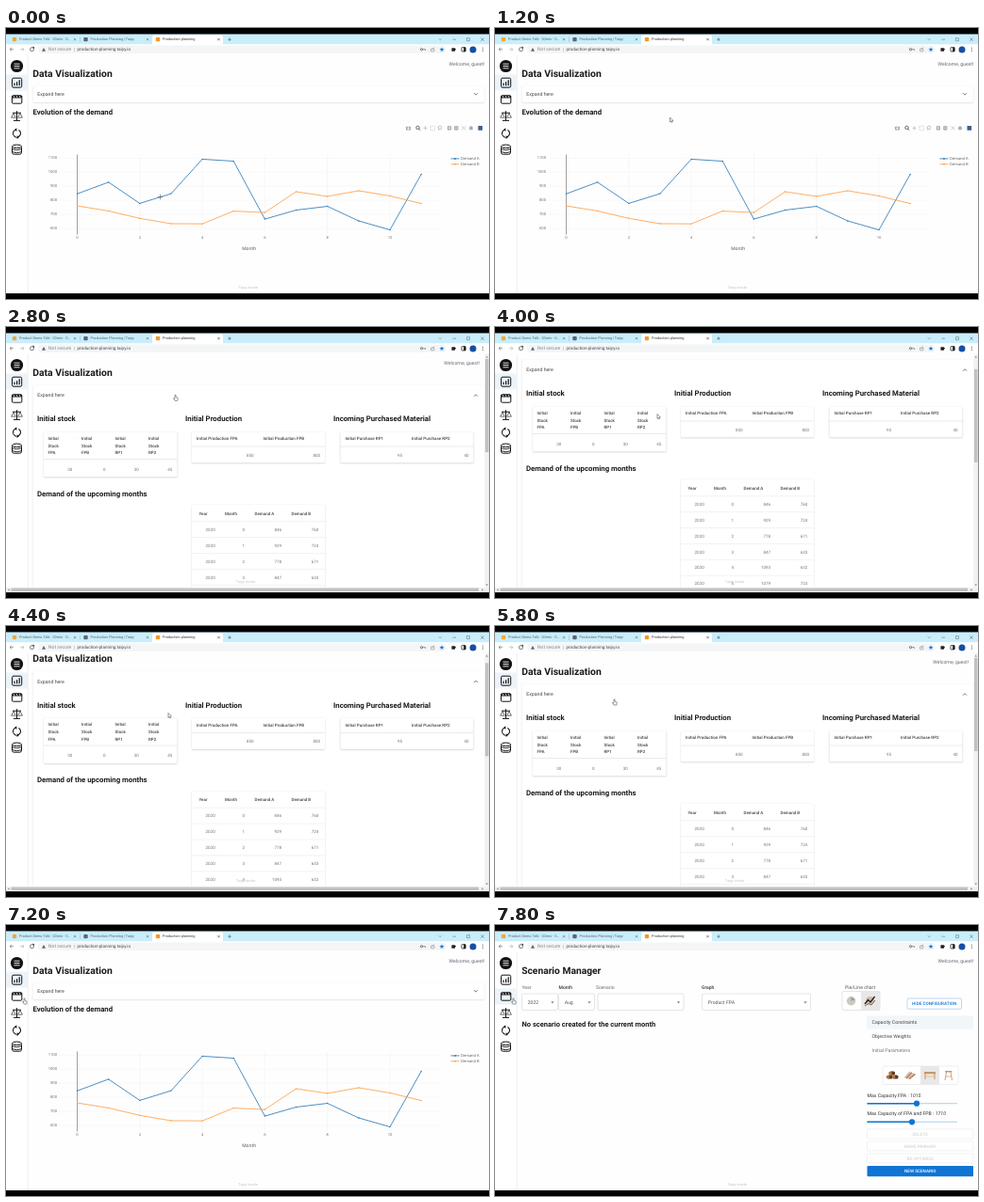
Recreate the animation shown at these times as an HTML page with a canvas. Size 512x288 px, loop 8000 ms.

```html
<!DOCTYPE html>
<html lang="en">
<head>
<meta charset="utf-8">
<title>Production planning</title>
<style>
  html, body { margin: 0; width: 100%; height: 100%; overflow: hidden; background: #000; }
  canvas { display: block; width: 512px; height: 288px; }
</style>
</head>
<body>
<canvas id="stage"></canvas>
<script>
const LOOP = 8000, STEP = 200, BOTTOM = 282;
const BLUE = '#2f7ab8', ORANGE = '#ffa04a', PRIMARY = '#0f74d4', INK = '#202124', GREY = '#666';
const demandA = [846, 929, 778, 847, 1093, 1079, 666, 730, 757, 653, 589, 985];
const demandB = [760, 724, 671, 633, 632, 723, 713, 861, 828, 868, 831, 777];

const canvas = document.getElementById('stage');
const ratio = window.devicePixelRatio || 1;
canvas.width = 512 * ratio;
canvas.height = 288 * ratio;
const c = canvas.getContext('2d');
c.scale(ratio, ratio);
c.textRendering = 'geometricPrecision'; // unhinted glyphs at fractional sizes

// Drawing helpers
function text(str, x, y, size = 4.3, color = GREY, { weight = 400, align = 'left', family = 'Roboto', style = 'normal' } = {}) {
  c.font = `${style} ${weight} ${size}px ${family}, sans-serif`;
  c.textAlign = align;
  c.textBaseline = 'middle';
  c.fillStyle = color;
  c.fillText(str, x, y);
}
const title = (str, x, y, size = 7.8) => text(str, x, y, size, '#1c1c1c', { weight: 700 });
function rect(x, y, w, h, fill, radius = 0, stroke, width = .6) {
  c.beginPath();
  c.roundRect(x, y, w, h, radius);
  if (fill) { c.fillStyle = fill; c.fill(); }
  if (stroke) { c.strokeStyle = stroke; c.lineWidth = width; c.stroke(); }
}
function circle(x, y, r, fill, stroke, width = .8) {
  c.beginPath();
  c.arc(x, y, r, 0, 7);
  if (fill) { c.fillStyle = fill; c.fill(); }
  if (stroke) { c.strokeStyle = stroke; c.lineWidth = width; c.stroke(); }
}
function line(points, color, width = .6) {
  c.beginPath();
  points.forEach(([x, y]) => c.lineTo(x, y));
  c.strokeStyle = color;
  c.lineWidth = width;
  c.stroke();
}
function shape(points, fill, stroke) {
  c.beginPath();
  points.forEach(([x, y]) => c.lineTo(x, y));
  c.closePath();
  c.fillStyle = fill;
  c.fill();
  if (stroke) { c.strokeStyle = stroke; c.lineWidth = .6; c.stroke(); }
}
const cross = (x, y, r, color) => {
  line([[x - r, y - r], [x + r, y + r]], color);
  line([[x - r, y + r], [x + r, y - r]], color);
};
const plus = (x, y, r, color) => {
  line([[x - r, y], [x + r, y]], color);
  line([[x, y - r], [x, y + r]], color);
};
const caret = (x, y) => shape([[x - 1.6, y - .8], [x + 1.6, y - .8], [x, y + 1]], '#666');

// Eased value between [time, value] keys
function track(keys, t) {
  const next = keys.findIndex(k => k[0] > t);
  if (next < 0) return keys[keys.length - 1][1];
  if (next === 0) return keys[0][1];
  const [t0, v0] = keys[next - 1], [t1, v1] = keys[next];
  const p = (t - t0) / (t1 - t0);
  return v0 + (v1 - v0) * p * p * (3 - 2 * p);
}

const pointer = [
  [200, 163, 179], [1200, 186.5, 97.5], [1800, 180, 76], [3400, 180, 75], [4000, 173, 95], [4600, 173, 95],
  [5200, 128, 54], [5400, 92, 60], [5800, 127, 81], [6000, 127, 81], [6400, 42, 77], [7000, 20, 81]
];
const pointerX = pointer.map(([t, x]) => [t, x]);
const pointerY = pointer.map(([t, , y]) => [t, y]);
const openKeys = [[1800, 0], [2200, 1], [6000, 1], [6400, 0]];
const scrollKeys = [[3600, 0], [4000, 27], [4200, 27], [4600, 0]];

function drawBrowser() {
  rect(0, 6.4, 512, 12, '#c9edfb');
  rect(155, 7.5, 75, 11, '#fff', 2);
  rect(0, 17.3, 512, 11.2, '#fff');
  rect(34, 18.5, 432, 8.6, '#f3f5f6', 4);
  const tab = (x, color, label, closeX, ink) => {
    rect(x - 2.2, 9.9, 4.4, 4.4, color, 1);
    text(label, x + 5, 12.3, 3.85, ink);
    cross(closeX, 12.2, 1.1, ink);
  };
  tab(9, '#f0a93a', 'Product Demo Talk - 20min - S…', 73, '#566');
  tab(84.5, '#5b6478', 'Production Planning | Taipy', 150, '#566');
  tab(161, '#f09a2a', 'Production planning', 225.5, '#333');
  line([[78.5, 9.5], [78.5, 15]], '#8fb5c6', .5);
  plus(237, 12.2, 1.7, '#455');
  line([[458.8, 11.4], [460.2, 12.8], [461.6, 11.4]], '#678');
  line([[473.5, 12.2], [477, 12.2]], '#678');
  rect(488.5, 10.7, 3, 3, null, 0, '#678');
  cross(505, 12.2, 1.6, '#567');

  for (const [x, dir, color] of [[6, -1, '#666'], [17, 1, '#aaa']]) {
    line([[x - 2 * dir, 22.7], [x + 2 * dir, 22.7]], color);
    line([[x, 20.9], [x + 2 * dir, 22.7], [x, 24.5]], color);
  }
  circle(27.5, 22.7, 2, null, '#444', .7);
  shape([[28, 19.7], [30.3, 20.2], [29.3, 22.2]], '#444');
  shape([[38, 24.8], [42, 24.8], [40, 21]], '#5f6368');
  text('Not secure', 45, 23, 5, '#888');
  line([[72.5, 21], [72.5, 25]], '#aaa', .5);
  text('production-planning.taipy.io', 75.5, 23, 4.6, '#444');

  circle(440.5, 22.7, 1.1, null, '#555');
  line([[441.5, 22.7], [444.5, 22.7], [444.5, 24]], '#555');
  rect(450.5, 22, 3.4, 2.8, null, .4, '#888');
  line([[451.8, 23], [454, 20.6]], '#888');
  const star = Array.from({ length: 10 }, (_, i) => {
    const r = i % 2 ? 1.1 : 2.6, a = i * Math.PI / 5 - Math.PI / 2;
    return [462 + r * Math.cos(a), 22.9 + r * Math.sin(a)];
  });
  shape(star, '#1a73e8');
  rect(472.4, 21.2, 3.6, 3.6, '#222', .5);
  circle(476, 22.6, .9, '#222');
  rect(483, 20.6, 4.2, 4.4, '#fff', .5, '#222', .8);
  rect(485.1, 20.6, 2.1, 4.4, '#222');
  circle(495, 22.9, 3.5, '#174ea6');
  [21, 22.8, 24.6].forEach(y => circle(505.3, y, .5, '#444'));
}

function drawSidebar(scenario) {
  rect(0, 28.5, 23, BOTTOM - 28.5, '#fff');
  line([[23.2, 28.5], [23.2, BOTTOM]], '#e4e4e4', .6);
  rect(0, scenario ? 67.5 : 49.5, 23, 17, '#ecf3f9');
  const ink = '#111';
  circle(11.5, 40.5, 6.6, ink);
  [38.2, 40.5, 42.8].forEach(y => line([[8.5, y], [14.5, y]], '#fff', .9));

  rect(6.5, 53.2, 10.2, 10, null, 1.5, ink, 1);
  line([[9, 61.3], [9, 58.5]], ink, 1.2);
  line([[11.6, 61.3], [11.6, 57.3]], ink, 1.2);
  line([[14.2, 61.3], [14.2, 55.3]], ink, 1.2);

  rect(6.4, 71.8, 10.4, 8.4, null, 1, ink, 1);
  rect(6.4, 71.8, 10.4, 2.7, ink, 1);
  [8, 11, 14].forEach(x => line([[x, 72], [x + 1.2, 74.2]], '#fff', .8));

  line([[11.5, 88.2], [11.5, 98.2]], ink, 1);
  line([[8, 98.4], [15, 98.4]], ink, 1);
  line([[7, 90.2], [16, 90.2]], ink, 1);
  [8, 15].forEach(x => shape([[x - 2.4, 95.2], [x, 90.7], [x + 2.4, 95.2]], '#fff', ink));

  c.beginPath();
  c.arc(11.5, 112, 4, -1.1, 1.5);
  c.moveTo(9.8, 115.6);
  c.arc(11.5, 112, 4, 2, 4.6);
  c.strokeStyle = ink; c.lineWidth = 1.1; c.stroke();
  shape([[11.3, 106.2], [11.3, 110], [9.1, 108.1]], ink);
  shape([[11.7, 114.2], [11.7, 118], [13.9, 116.1]], ink);

  rect(6.5, 125.2, 10, 9, null, 2, ink, 1);
  c.beginPath(); c.ellipse(11.5, 125.8, 5, 1.8, 0, 0, 7);
  c.fillStyle = '#fff'; c.fill(); c.stroke();
  [128.7, 131.7].forEach(y => line([[6.5, y], [11.5, y + 1], [16.5, y]], ink, .9));
}

function drawModebar(y) {
  const g = '#a6abb2';
  rect(424, y - 1.6, 5, 3.8, g, .6);
  circle(426.5, y + .3, 1.1, '#fff');
  circle(436.5, y - .4, 1.7, null, '#5b6675', 1);
  line([[437.6, y + .8], [439.3, y + 2.4]], '#5b6675', 1);
  plus(444.5, y, 2.2, g);
  c.setLineDash([1, 1]);
  rect(450, y - 2, 4.4, 4.4, null, 0, g);
  c.setLineDash([]);
  circle(460, y - .4, 1.8, null, g, .7);
  line([[459, y + 1], [458.4, y + 2.6]], g);
  for (const x of [470, 477.3]) {
    rect(x - 2.1, y - 2.1, 4.2, 4.2, g, .4);
    line([[x - 1.2, y], [x + 1.2, y]], '#fff');
  }
  line([[470, y - 1.2], [470, y + 1.2]], '#fff');
  cross(485.3, y, 2, g);
  shape([[490.5, y], [493, y - 2.3], [495.5, y], [494.7, y], [494.7, y + 2], [491.3, y + 2], [491.3, y]], g);
  rect(500.5, y - 2.2, 4.6, 4.6, '#3f5f8f');
}

function drawChart(dy, modebar) {
  title('Evolution of the demand', 28.5, 90.2 + dy, 7.75);
  if (modebar) drawModebar(106.3 + dy);
  const px = i => 75.5 + 33.15 * i, py = v => 212.9 + dy - (v - 600) * .149;
  const axis = { family: '"Open Sans"' };
  for (let v = 600; v <= 1100; v += 100) {
    line([[55.5, py(v)], [460, py(v)]], '#f0f0f0', .5);
    text(v, 54, py(v), 4.1, GREY, { ...axis, align: 'right' });
  }
  for (let i = 0; i <= 10; i += 2) {
    line([[px(i), 134.5 + dy], [px(i), 219.5 + dy]], i ? '#f0f0f0' : '#777', i ? .5 : .7);
    text(i, px(i), 222.9 + dy, 4.1, GREY, { ...axis, align: 'center' });
  }
  text('Month', 257.7, 235 + dy, 4.9, '#444', { ...axis, align: 'center' });
  [['Demand A', demandA, BLUE, 138.9], ['Demand B', demandB, ORANGE, 144.7]].forEach(([name, data, color, y]) => {
    line(data.map((v, i) => [px(i), py(v)]), color, .85);
    data.forEach((v, i) => circle(px(i), py(v), .7, color));
    line([[471.5, y + dy], [480.5, y + dy]], color, .85);
    circle(476, y + dy, .9, color);
    text(name, 482, y + dy, 4, '#555', axis);
  });
}

function card(x, y, w, h, shade = .24) {
  c.save();
  c.shadowColor = `rgba(0,0,0,${shade})`;
  c.shadowBlur = 1.6 * ratio;
  c.shadowOffsetY = .6 * ratio;
  rect(x, y, w, h, '#fff', 1);
  c.restore();
}
const tableHead = (str, x, y) => text(str, x, y, 4.5, '#444', { weight: 500 });
const number = (str, x, y) => text(str, x, y, 4.5, '#777', { align: 'right' });

function pairTable(x, label, suffixes, values) {
  card(x, 111.5, 141, 33);
  line([[x, 127], [x + 141, 127]], '#ddd');
  suffixes.forEach((suffix, i) => {
    tableHead(`${label} ${suffix}`, x + 5 + 70.5 * i, 118.8);
    number(values[i], x + 65.5 + 70.5 * i, 136.2);
  });
}

function drawDetails() {
  title('Initial stock', 33, 97.9);
  title('Initial Production', 190, 97.9);
  title('Incoming Purchased Material', 347, 97.9);
  card(40, 111.5, 141.5, 48);
  line([[40, 140.5], [181.5, 140.5]], '#ddd');
  ['FPA', 'FPB', 'RP1', 'RP2'].forEach((name, i) => {
    ['Initial', 'Stock', name].forEach((word, row) => tableHead(word, 44.5 + 35.5 * i, 118.6 + 7.6 * row));
    number([30, 0, 30, 45][i], 70.3 + 35.3 * i, 151.2);
  });
  pairTable(197, 'Initial Production', ['FPA', 'FPB'], [850, 800]);
  pairTable(354.5, 'Initial Purchase', ['RP1', 'RP2'], [95, 40]);

  title('Demand of the upcoming months', 33, 177.4);
  card(197, 189, 141, 221);
  [['Year', 204.5], ['Month', 232], ['Demand A', 263.5], ['Demand B', 302.5]].forEach(([name, x]) => tableHead(name, x, 198.5));
  demandA.forEach((a, i) => {
    const y = 215.5 + 16.9 * i;
    line([[197, y - 8.8], [338, y - 8.8]], '#e4e4e4', .5);
    [[2020, 221.7], [i, 253], [a, 292], [demandB[i], 331.3]].forEach(([v, x]) => number(v, x, y));
  });
}

function drawDataPage(open, modebar) {
  const bottom = 79 + 350 * open, headY = 70.2 + 2.5 * open;
  title('Data Visualization', 28.2, 48.9, 10.4);
  card(28.5, 61.5, 478.5, bottom - 61.5, .16);
  text('Expand here', 33.3, headY, 5.2, '#444');
  const tip = open > .5 ? -1 : 1;
  line([[496, headY - tip], [498, headY + tip], [500, headY - tip]], '#555', .8);
  if (open > 0) {
    c.save();
    c.beginPath();
    c.rect(24, 80, 483, bottom - 80);
    c.clip();
    drawDetails();
    c.restore();
  }
  drawChart(bottom - 79 + open, modebar);
}

function select(label, x, labelX, w, value, dark) {
  text(label, labelX, 66.5, 5, dark ? '#333' : '#666', { weight: dark ? 500 : 400 });
  rect(x, 73, w, 17.5, '#fff', 1.2, '#d6d6d6');
  text(value, x + 6.2, 82.2, 5.15, '#555');
  caret(x + w - 5.5, 82.2);
}
function slider(y, thumb) {
  line([[394.5, y], [490, y]], '#a9cdf0', 1.1);
  line([[394.5, y], [thumb, y]], PRIMARY, 1.4);
  circle(thumb, y, 3.1, PRIMARY);
}
function capacity(label, value, y) {
  text(label, 394.5, y, 5.2, '#333');
  const end = 394.5 + c.measureText(label + ' ').width;
  text(value, end, y, 5.2, '#333', { style: 'italic' });
}

function drawScenarioPage() {
  title('Scenario Manager', 28.2, 48.7, 10.25);
  select('Year', 28.5, 28.5, 38, '2022');
  select('Month', 67.5, 67.5, 38, 'Aug', true);
  select('Scenario', 109, 107, 91, '');
  select('Graph', 219.5, 219, 115, 'Product FPA', true);
  text('Pie/Line chart', 371, 66.5, 5.15, '#555');
  rect(368, 70.5, 40, 20, '#fff', 1.5, '#d6d6d6');
  rect(388, 70.5, 20, 20, '#e8e8e8');
  circle(377.5, 80.8, 4.7, '#c6cac4');
  shape([[377.5, 80.8], [377.5, 76], [382, 79.5]], '#8fa897');
  shape([[377.5, 80.8], [382, 82.5], [379, 85.3]], '#d8c999');
  circle(397.5, 80.5, 4.5, '#cbbfae');
  line([[392, 84], [395.5, 79.5], [398, 82], [402.5, 76]], '#222', 1.4);
  line([[392, 86], [396, 83.5], [399, 85], [403, 80]], '#8a6a4a', 1);
  rect(437, 78, 57.5, 11.2, '#fff', 1.2, '#8abcec');
  text('HIDE CONFIGURATION', 465.7, 84, 4.65, PRIMARY, { weight: 500, align: 'center' });
  title('No scenario created for the current month', 28.5, 105.7, 7.5);

  rect(394, 96.5, 113, 14, '#f2f6f9');
  ['Capacity Constraints', 'Objective Weights', 'Initial Parameters'].forEach((name, i) =>
    text(name, 399.5, 103.8 + 15 * i, 5.2, i === 2 ? '#777' : '#444'));

  rect(411, 150, 80, 19.5, '#fff', 1.5, '#e4e4e4');
  rect(451, 150, 20, 19.5, '#e8e8e8');
  [[417.5, 161.5], [423.5, 161.5], [420, 157.5]].forEach(([x, y]) => {
    rect(x - 2, y - 2, 6, 4, '#5a3822', 1.5);
    circle(x - 1, y, 1.8, '#b57842');
  });
  for (let i = 0; i < 4; i++) line([[434.5 + 1.5 * i, 162.5 + i * .4], [440 + 1.8 * i, 156 + i * .8]], i % 2 ? '#a9785a' : '#d9b096', 1.4);
  const wood = '#c9966b';
  rect(455, 156, 12, 2.2, wood);
  line([[456, 158], [456, 164]], wood, 1.1);
  line([[466, 158], [466, 164]], wood, 1.1);
  line([[456, 161], [466, 161]], '#dcb894', .8);
  rect(477, 155, 7.5, 1.6, wood, 1);
  line([[478.5, 156], [477, 165]], wood, .9);
  line([[483, 156], [484.5, 165]], wood, .9);
  line([[478, 161], [484, 161]], wood, .7);

  capacity('Max Capacity FPA :', '1015', 181.4);
  slider(189.7, 447);
  capacity('Max Capacity of FPA and FPB :', '1710', 200.6);
  slider(209.3, 442);
  ['DELETE', 'MAKE PRIMARY', 'RE-OPTIMIZE', 'NEW SCENARIO'].forEach((name, i) => {
    const active = i === 3, y = 217 + 13 * i;
    rect(394.5, y, 112.5, active ? 11.3 : 10, active ? PRIMARY : '#fff', 1, active ? null : '#eaeaea');
    text(name, 450.7, y + (active ? 5.9 : 5.2), 4.65, active ? '#fff' : '#d4d4d4', { weight: 500, align: 'center' });
  });
}

function drawScrollbars(open, scroll) {
  const thumb = 240 * 248 / (251 + 350 * open);
  const top = 34 + scroll * thumb / 248;
  rect(507.5, 28.5, 4.5, 248, '#f1f1f1');
  rect(508, top, 3.5, Math.min(thumb, 272 - top), '#c1c1c1');
  shape([[508.5, 32.5], [511, 32.5], [509.7, 31]], '#777');
  shape([[508.5, 273.5], [511, 273.5], [509.7, 275]], '#777');
  rect(0, 276.8, 512, BOTTOM - 276.8, '#f1f1f1');
  rect(5.5, 277.4, 495.5, 3.7, '#c1c1c1');
  shape([[3.5, 278], [3.5, 280.5], [2, 279.2]], '#777');
  shape([[504.5, 278], [504.5, 280.5], [506, 279.2]], '#777');
}

function drawPointer(x, y, scenario, open) {
  if (!scenario && !open && x > 55 && y > 134) {
    plus(x + .5, y + .5, 2.8, '#555');
  } else if (x < 23 || (y > 61 && y < 86)) {
    shape([[x - 1, y - 3], [x, y - 3], [x + .2, y - .7], [x + 2.2, y], [x + 1.8, y + 3], [x - 1, y + 3], [x - 2.4, y + .5], [x - 1, y + .8]], '#fff', '#555');
  } else {
    shape([[x - 1, y - 2.5], [x - 1, y + 2.4], [x + .1, y + 1.5], [x + 1, y + 3], [x + 1.6, y + 2.6], [x + .9, y + 1.1], [x + 2.4, y + 1]], '#fff', '#555');
  }
}

function render(t) {
  const open = track(openKeys, t), scroll = track(scrollKeys, t), scenario = t >= 7400;
  rect(0, 0, 512, 288, '#000');
  rect(0, 28, 512, BOTTOM - 28, '#fefefe');
  c.save();
  c.beginPath();
  c.rect(0, 28.5, 512, BOTTOM - 28.5);
  c.clip();
  c.translate(0, -scroll);
  if (scenario) drawScenarioPage(); else drawDataPage(open, t < 1400);
  text('Welcome, guest!', open ? 502 : 507.3, 38.4, 5.15, '#667', { align: 'right' });
  c.restore();
  drawSidebar(scenario);
  text('Taipy inside', open ? 254 : 256.5, open ? 270.5 : 275.5, 3.9, '#c4c4c4', { align: 'center' });
  if (open) drawScrollbars(open, scroll);
  drawBrowser();
  drawPointer(track(pointerX, t), track(pointerY, t), scenario, open);
}

function frame() {
  const t = performance.now() % LOOP;
  render(Math.floor(t / STEP) * STEP);
  requestAnimationFrame(frame);
}
frame();
</script>
</body>
</html>
```
